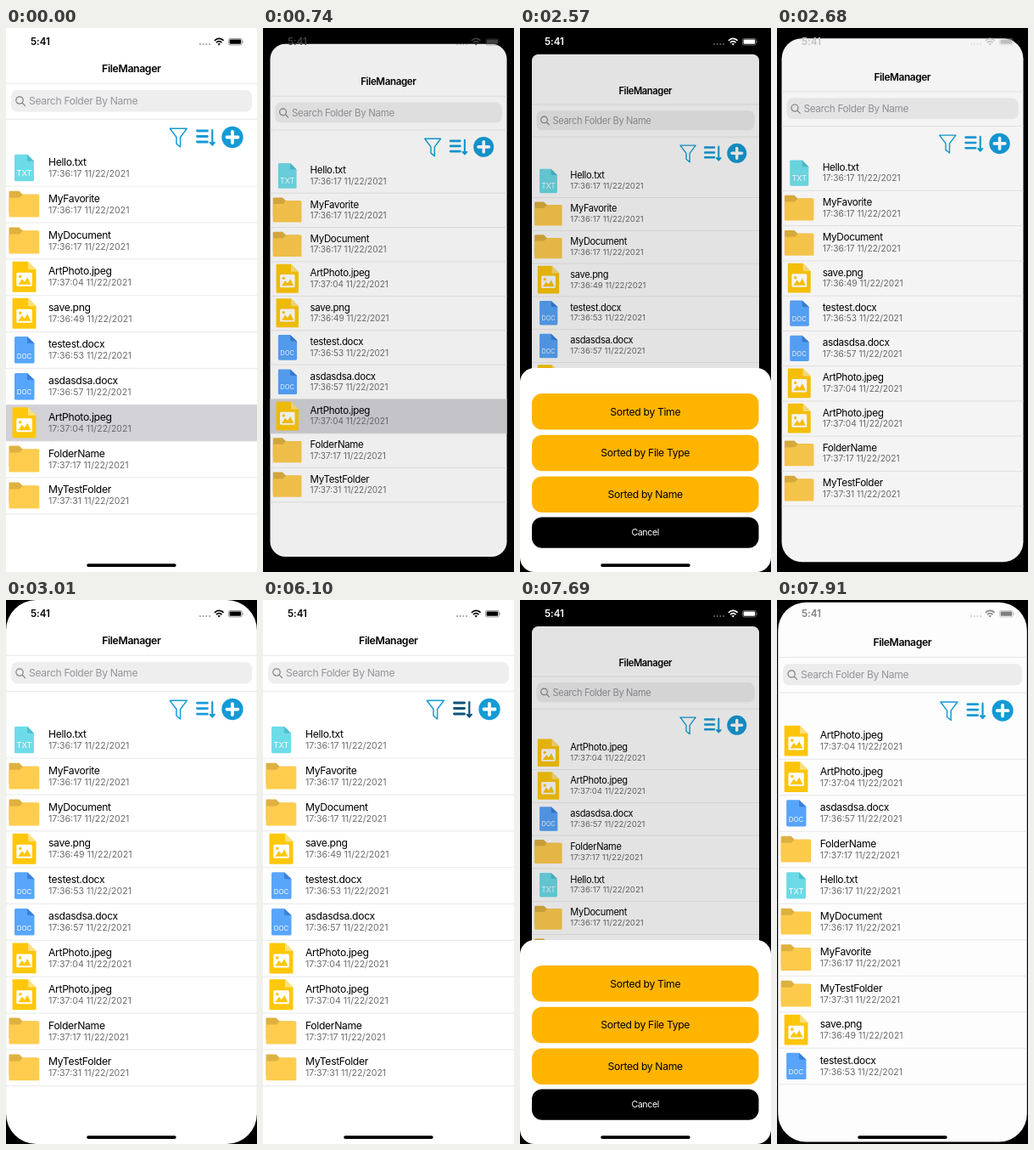
An HTML page for the animation above (8000 ms loop, 296 by 640 pixels).

```html
<!DOCTYPE html>
<html lang="en">
<head>
<meta charset="utf-8">
<title>File list</title>
<style>
  html, body { margin: 0; width: 100%; height: 100%; overflow: hidden; background: #fff; }
  svg { display: block; width: 100%; height: 100%; }
  text { font-family: Inter, Roboto, sans-serif; font-size: 12.2px; letter-spacing: -.35px; }
  .mid { text-anchor: middle; }
  .title { font-size: 12.3px; font-weight: 600; letter-spacing: -.4px; }
  .clock { font-size: 11.6px; font-weight: 600; letter-spacing: -.05px; }
  .date { font-size: 10.6px; letter-spacing: 0; fill: #6c6c6e; }
  .tag { font-size: 8px; letter-spacing: 0; fill: #fff; text-anchor: middle; }
</style>
</head>
<body>
<svg viewBox="0 0 296 640">
  <defs>
    <g id="txt">
      <path d="M11.5 5.5H25L33 13.5V35.5Q33 37 31.5 37H11.5Q10 37 10 35.5V7Q10 5.5 11.5 5.5Z" fill="#6edce8"/>
      <path d="M25 5.5L33 13.5H26.5Q25 13.5 25 12Z" fill="#4dbfd0"/>
      <text class="tag" x="21.5" y="31" style="font-size:9.5px">TXT</text>
    </g>
    <g id="doc">
      <path d="M11.5 5.5H25L33.5 13.5V35.5Q33.5 37 32 37H11.5Q10 37 10 35.5V7Q10 5.5 11.5 5.5Z" fill="#58a5fc"/>
      <path d="M25 5.5L33.5 13.5H26.5Q25 13.5 25 12Z" fill="#3b80dc"/>
      <text class="tag" x="21.5" y="31">DOC</text>
    </g>
    <g id="img">
      <path d="M8.5 3H26L35.5 12.5V38Q35.5 39 34.5 39H8.5Q7.5 39 7.5 38V4Q7.5 3 8.5 3Z" fill="#ffc709"/>
      <path d="M26 3L35.5 12.5H27Q26 12.5 26 11.5Z" fill="#ffe07a"/>
      <rect x="12.3" y="16" width="18.5" height="16" rx="1.5" fill="#fff"/>
      <path d="M14.3 30L18.8 23.5L21.8 27L25.3 21.5L29.3 30Z" fill="#ffc709"/>
      <circle cx="16.8" cy="20.5" r="1.8" fill="#ffc709"/>
    </g>
    <g id="dir">
      <path d="M4.5 5.5H15.5L19.5 9.5H37V30H3.5V6.5Q3.5 5.5 4.5 5.5Z" fill="#dfb13f"/>
      <path d="M20 9.5H38.3Q39.3 9.5 39.3 10.5V35.4Q39.3 36.4 38.3 36.4H4.5Q3.5 36.4 3.5 35.4V13.5H16Z" fill="#ffcc4d"/>
    </g>
  </defs>

  <rect id="back" width="296" height="640"/>
  <g id="card">
    <rect id="paper" width="296" height="640" fill="#fff"/>
    <text class="mid title" x="147.8" y="51.5">FileManager</text>
    <path d="M0 65.2H296M0 107.3H296" stroke="#e2e2e4" stroke-width=".8"/>
    <rect x="6" y="73" width="284" height="25.5" rx="7.5" fill="#eeeeef"/>
    <g fill="none" stroke="#808085" stroke-width="1.2" stroke-linecap="round">
      <circle cx="16" cy="85" r="4.2"/><path d="M19.2 88.2L22.5 91.5"/>
    </g>
    <text x="27" y="90.3" fill="#95959a">Search Folder By Name</text>
    <g fill="none" stroke="#149bd7">
      <path d="M193.3 118.3H213.3L205.6 128.5V140L201 136.2V128.5Z" stroke-width="1.5" stroke-linejoin="round"/>
      <g id="sort" stroke-width="2.8" stroke-linecap="round">
        <path d="M225.5 121H237.5M225.5 127.5H237.5M225.5 134H237.5"/>
        <path d="M243.3 120V137M240.8 134.8L243.3 137.4L245.8 134.8" stroke-width="2.2"/>
      </g>
    </g>
    <circle cx="267" cy="128.5" r="12.7" fill="#149bd7"/>
    <path d="M260.5 128.5H273.5M267 122V135" stroke="#fff" stroke-width="3.8" stroke-linecap="round"/>
    <g id="rows"></g>
    <rect id="dim" width="296" height="640"/>
  </g>

  <g id="status">
    <text class="clock" x="29" y="20.3">5:41</text>
    <g opacity=".4">
      <circle cx="229" cy="19" r="1"/><circle cx="232.7" cy="19" r="1"/>
      <circle cx="236.4" cy="19" r="1"/><circle cx="240.1" cy="19" r="1"/>
    </g>
    <path d="M245.9 14.8Q251.2 10 256.5 14.8M247.9 17.1Q251.2 14.2 254.5 17.1" fill="none" stroke="currentColor" stroke-width="1.7"/>
    <path d="M249.4 18.6Q251.2 17.2 253 18.6L251.2 20.5Z"/>
    <rect x="262.4" y="12.4" width="16" height="7.6" rx="2.2" fill="none" stroke="currentColor" stroke-width=".8" opacity=".5"/>
    <rect x="263.6" y="13.6" width="13.6" height="5.2" rx="1.2"/>
    <path d="M279.3 14.8Q280.8 16.2 279.3 17.6Z" opacity=".6"/>
  </g>

  <g id="sheet">
    <rect width="296" height="240" rx="17" fill="#fff"/>
    <g id="buttons"></g>
  </g>
  <rect id="home" x="95.2" y="630.2" width="105.5" height="3.8" rx="1.9"/>
</svg>
<script>
const $ = id => document.getElementById(id);
const LOOP = 8000, ROW = 42.85, TOP = 143.3;
const FIRST_SORT = 2570, SECOND_SORT = 7690;

const files = [
  ['txt', 'Hello.txt', '17:36:17'],
  ['dir', 'MyFavorite', '17:36:17'],
  ['dir', 'MyDocument', '17:36:17'],
  ['img', 'ArtPhoto.jpeg', '17:37:04'],
  ['img', 'save.png', '17:36:49'],
  ['doc', 'testest.docx', '17:36:53'],
  ['doc', 'asdasdsa.docx', '17:36:57'],
  ['img', 'ArtPhoto.jpeg', '17:37:04'],
  ['dir', 'FolderName', '17:37:17'],
  ['dir', 'MyTestFolder', '17:37:31']
].map(([kind, name, time], id) => ({ kind, name, time, id }));

const sortedBy = key => [...files].sort((a, b) => {
  const x = key(a), y = key(b);
  return x < y ? -1 : x > y ? 1 : 0;
});
const byTime = sortedBy(f => f.time);
const byName = sortedBy(f => f.name.toLowerCase());

$('rows').innerHTML = files.map(f => `<g id="row${f.id}">
  <rect id="mark${f.id}" width="296" height="${ROW}" fill="#d1d1d6" visibility="hidden"/>
  <use href="#${f.kind}"/>
  <text x="50" y="18.5">${f.name}</text>
  <text class="date" x="50" y="31.5">${f.time} 11/22/2021</text>
  <path d="M0 ${ROW}H296" stroke="#e4e4e6" stroke-width=".8"/></g>`).join('');

const button = (label, y, h, fill, ink, size) =>
  `<rect x="14" y="${y}" width="267.5" height="${h}" rx="12" fill="${fill}"/>
   <text class="mid" x="147.7" y="${y + h / 2 + size * .36}" fill="${ink}" style="font-size:${size}px">${label}</text>`;
$('buttons').innerHTML =
  ['Time', 'File Type', 'Name'].map((s, i) =>
    button('Sorted by ' + s, 30 + 48.7 * i, 42.6, '#ffb400', '#000', 12.2)).join('') +
  button('Cancel', 175.5, 36.2, '#000', '#fff', 10.6);

const moves = [
  { at: 500, step: 116, last: 5, open: true },
  { at: FIRST_SORT, step: 110, last: 4, open: false },
  { at: 6100, step: 112, last: 5, open: true },
  { at: SECOND_SORT, step: 110, last: 4, open: false }
];
const spring = u => 1 - (1 + u) * Math.exp(-u);

// p: how far the sheet is open, q: status bar fade to white
function pose(t) {
  const m = moves.filter(v => t >= v.at).pop();
  if (!m) return { p: 0, q: 0, pressed: false };
  const n = Math.min(m.last, Math.floor((t - m.at) / m.step));
  const k = m.open ? Math.max(0, n - 1) : n;
  const p = spring(k * 2.04), q = k / 4;
  return m.open ? { p, q, pressed: n === 0 } : { p: 1 - p, q: 1 - q, pressed: false };
}

function draw(t) {
  const { p, q, pressed } = pose(t);
  const y = 400 + 640 * (1 - p);
  const order = t < FIRST_SORT ? files : t < SECOND_SORT ? byTime : byName;

  $('back').setAttribute('visibility', p > 0 ? 'visible' : 'hidden');
  $('card').setAttribute('transform',
    `translate(148 ${320 + .7 * p}) scale(${1 - .0946 * p}) translate(-148 -320)`);
  const radius = p > 0 ? 35.7 - 27.5 * p : 0;
  $('paper').setAttribute('rx', radius);
  $('dim').setAttribute('rx', radius);
  $('dim').setAttribute('opacity', .11 * p);
  $('sort').setAttribute('stroke', pressed ? '#0b5378' : '#149bd7');

  order.forEach((f, i) => $('row' + f.id).setAttribute('transform', `translate(0 ${TOP + ROW * i})`));
  $('mark7').setAttribute('visibility', t < FIRST_SORT ? 'visible' : 'hidden');

  const g = Math.round(255 * q);
  $('status').style.color = $('status').style.fill = `rgb(${g},${g},${g})`;
  $('sheet').setAttribute('transform', `translate(0 ${y})`);
  $('home').setAttribute('fill', y > 430 && y < 500 ? '#444' : '#000');
}

const begin = performance.now();
function tick() {
  draw((performance.now() - begin) % LOOP);
  requestAnimationFrame(tick);
}
tick();
</script>
</body>
</html>
```
